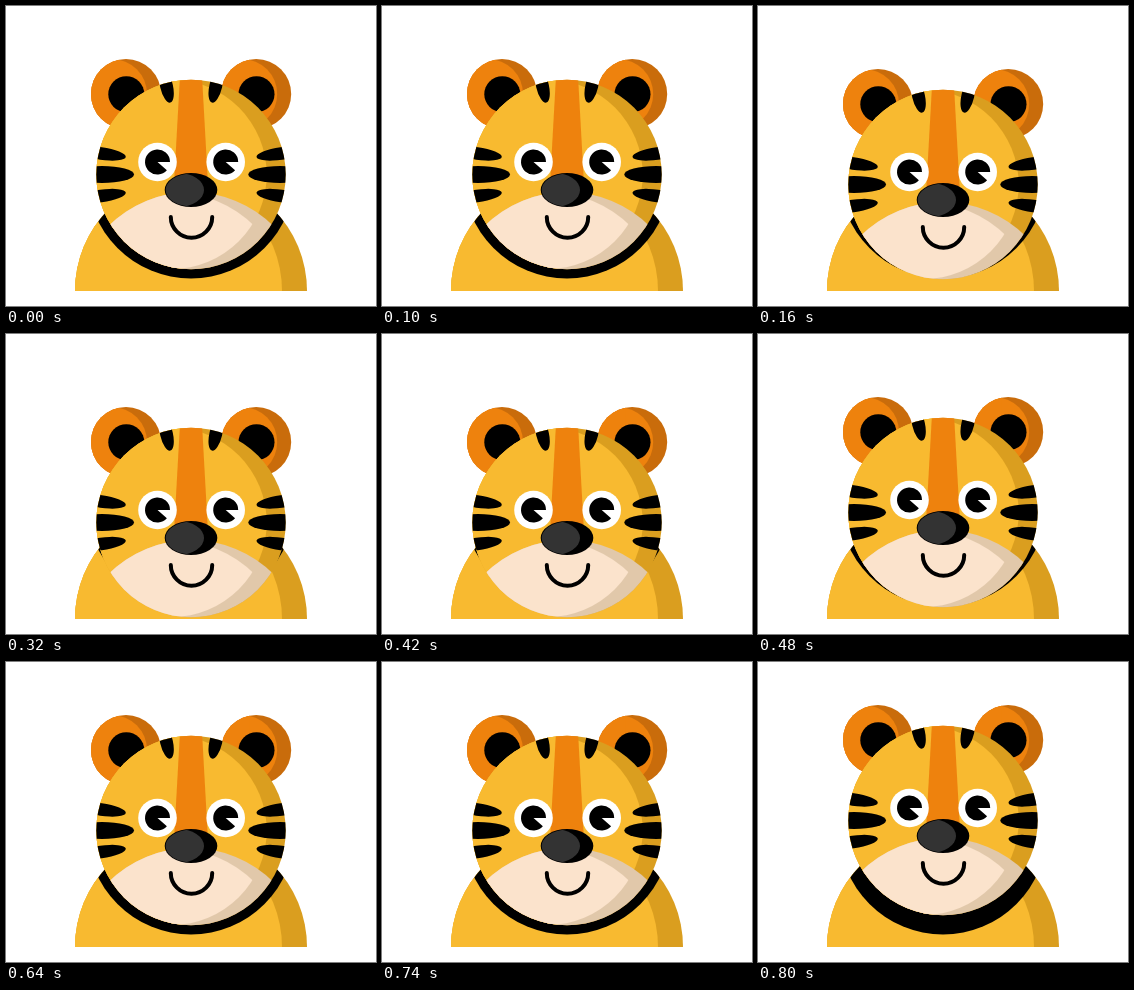
Write an HTML page with a canvas that moves like this. It is 370x300 px and loops after 0.96 s.

```html
<!DOCTYPE html>
<html lang="en">
<head>
<meta charset="utf-8">
<title>Bobbing tiger</title>
<style>
html, body { margin: 0; width: 100%; height: 100%; overflow: hidden; background: #fff; }
canvas { display: block; }
</style>
</head>
<body>
<canvas id="stage" width="370" height="300"></canvas>
<script>
const ctx = document.getElementById('stage').getContext('2d');
const STEP = 160;
const BOB = [0, 10, 20, 10, 0, -10];
const MID = 185;
const YELLOW = '#f8ba30', YELLOW_DARK = '#da9e1f';
const ORANGE = '#ee820d', ORANGE_DARK = '#c96c0b';
const CREAM = '#fbe3cc', CREAM_DARK = '#e1c8aa';
const BLACK = '#000', GREY = '#333';

function oval(x, y, rx, ry = rx, tilt = 0) {
  const path = new Path2D();
  path.ellipse(x, y, rx, ry, tilt * Math.PI / 180, 0, Math.PI * 2);
  return path;
}

function fill(path, color) {
  ctx.fillStyle = color;
  ctx.fill(path);
}

function clipped(paths, draw) {
  ctx.save();
  paths.forEach(path => ctx.clip(path));
  draw();
  ctx.restore();
}

// A round shape whose lit side is its own outline shifted left.
function shadedDisc(x, y, r, shift, light, dark) {
  const disc = oval(x, y, r);
  fill(disc, dark);
  clipped([disc], () => fill(oval(x - shift, y, r), light));
  // The lit copy starts short of the left rim, so fill that side too.
  const left = new Path2D();
  left.rect(x - r, y - r, r - shift / 2, r * 2);
  clipped([disc], () => fill(left, light));
}

function mirrored(draw) {
  draw();
  ctx.save();
  ctx.translate(MID * 2 + 0.3, 0);
  ctx.scale(-1, 1);
  draw();
  ctx.restore();
}

function drawBody() {
  const frame = new Path2D();
  frame.rect(0, 0, 370, 285);
  clipped([frame], () => {
    shadedDisc(MID, 285, 116, 25, YELLOW, YELLOW_DARK);
    clipped([oval(MID, 285, 116)], () => fill(oval(MID, 168.5, 104), BLACK));
  });
}

function drawEar(x) {
  shadedDisc(x, 88, 35, 14, ORANGE, ORANGE_DARK);
  fill(oval(x + 0.3, 88.2, 18), BLACK);
}

function drawMuzzle(head) {
  const top = oval(MID, 303, 117);
  clipped([head], () => fill(top, CREAM_DARK));
  clipped([head, top, oval(MID - 19, 168.5, 94.5)],
    () => fill(oval(MID - 19, 303, 117), CREAM));
}

function drawStripes() {
  fill(new Path2D('M174 70H196L202 178H168Z'), ORANGE);
  mirrored(() => {
    fill(oval(160.5, 80, 6.4, 17, -13), BLACK);
    fill(oval(95, 147.5, 25, 6.3, 8), BLACK);
    fill(oval(96, 168.5, 32, 8.5), BLACK);
    fill(oval(95, 190, 25, 6.3, -8), BLACK);
  });
}

function drawEye(x) {
  const y = 156;
  fill(oval(x, y, 19.3), '#fff');
  const pupil = new Path2D();
  pupil.moveTo(x, y);
  pupil.arc(x, y, 12.5, Math.PI * 0.23, Math.PI * 2);
  pupil.closePath();
  fill(pupil, BLACK);
}

function drawNose() {
  const nose = oval(MID, 184, 26.3, 17);
  fill(nose, BLACK);
  clipped([oval(MID, 184, 25.3, 16.2)],
    () => fill(oval(MID - 13, 184, 26, 17), GREY));
}

function drawMouth() {
  ctx.strokeStyle = BLACK;
  ctx.lineWidth = 4;
  ctx.lineCap = 'round';
  ctx.beginPath();
  ctx.arc(MID + 0.5, 211, 20.7, 0, Math.PI);
  ctx.stroke();
}

function drawHead() {
  const head = oval(MID, 168.5, 94.7);
  drawEar(120);
  drawEar(250.2);
  shadedDisc(MID, 168.5, 94.7, 19, YELLOW, YELLOW_DARK);
  drawMuzzle(head);
  clipped([head], drawStripes);
  drawEye(151.5);
  drawEye(219.7);
  drawNose();
  drawMouth();
}

function render(time) {
  ctx.fillStyle = '#fff';
  ctx.fillRect(0, 0, 370, 300);
  drawBody();
  ctx.save();
  ctx.translate(0, BOB[Math.floor(time / STEP) % BOB.length]);
  drawHead();
  ctx.restore();
}

function tick() {
  render(performance.now());
  requestAnimationFrame(tick);
}
tick();
</script>
</body>
</html>
```
